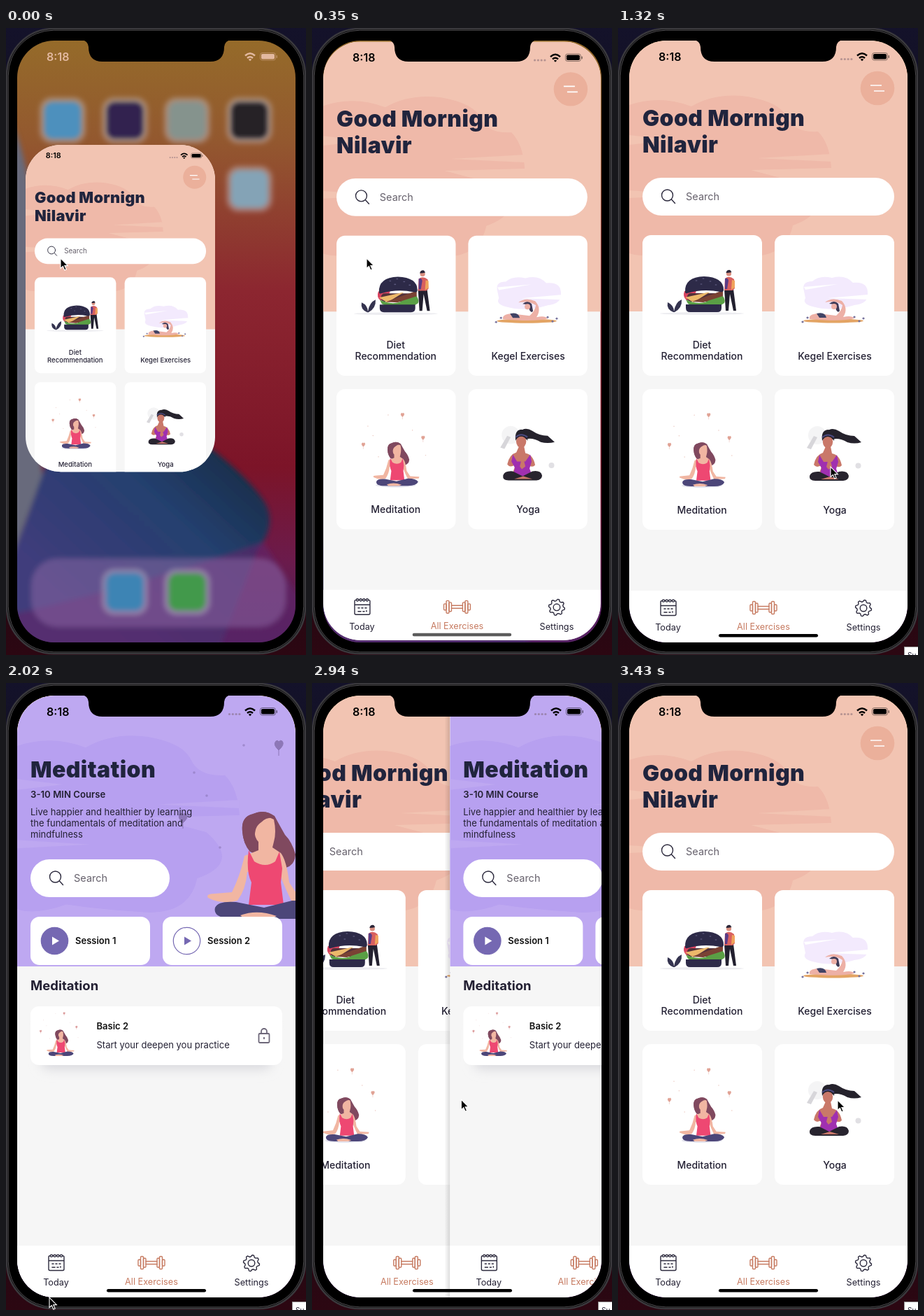
These frames come from a looping animation (429 px wide and 896 px high, 3.5 s). An HTML page:

```html
<!DOCTYPE html>
<html lang="en">
<head>
<meta charset="utf-8">
<title>Wellness app</title>
<style>
html, body { margin: 0; width: 100%; height: 100%; overflow: hidden; background: #0d0c18; }
svg { display: block; width: 100%; height: 100%; }
text { font-family: Inter, "Liberation Sans", sans-serif; fill: #232033; }
.h1 { font-size: 32px; font-weight: 900; letter-spacing: .4px; fill: #20243d; }
.h2 { font-size: 18.5px; font-weight: 700; }
.card { font-size: 14px; font-weight: 500; text-anchor: middle; }
.find { font-size: 14.5px; fill: #66616c; }
.body { font-size: 13px; }
.bold { font-size: 13px; font-weight: 600; fill: #111; }
.tab { font-size: 12.7px; text-anchor: middle; }
.time { font-size: 16px; font-weight: 600; text-anchor: middle; fill: currentColor; }
.line { fill: none; stroke: #2c2a3d; stroke-width: 1.4; stroke-linecap: round; stroke-linejoin: round; }
</style>
</head>
<body>
<svg id="stage" viewBox="0 0 429 896" preserveAspectRatio="none"></svg>
<script>
const SPAN = 3500, WIDTH = 398;

// ---- drawing helpers ----
const box = (x, y, w, h, r, fill, more = '') =>
  `<rect x="${x}" y="${y}" width="${w}" height="${h}" rx="${r}" fill="${fill}" ${more}/>`;
const path = (d, fill, more = '') => `<path d="${d}" fill="${fill}" ${more}/>`;
const line = (d, more = '') => `<path class="line" d="${d}" ${more}/>`;
const dot = (x, y, r, fill, more = '') => `<circle cx="${x}" cy="${y}" r="${r}" fill="${fill}" ${more}/>`;
const oval = (x, y, rx, ry, fill) => `<ellipse cx="${x}" cy="${y}" rx="${rx}" ry="${ry}" fill="${fill}"/>`;
const text = (cls, x, y, s, more = '') => `<text class="${cls}" x="${x}" y="${y}" ${more}>${s}</text>`;
const use = (id, move, color = '#000') => `<use href="#${id}" transform="${move}" color="${color}"/>`;
const group = (move, inner) => `<g transform="${move}">${inner}</g>`;

const gear = Array.from({ length: 32 }, (_, i) => {
  const a = (i - 1.5) * Math.PI / 16, r = i % 4 < 2 ? 9.2 : 11.6;
  return `${(351 + r * Math.cos(a)).toFixed(1)} ${(829 + r * Math.sin(a)).toFixed(1)}`;
}).join('L');

const search = (y, w) => box(35, y, w, 54, 27, '#fff') +
  `<circle class="line" cx="70.5" cy="${y + 25}" r="8"/>` + line(`M76.5 ${y + 31}l5 5.5`) +
  text('find', 97, y + 32, 'Search');

const calendar = line('M61 820.5q0-2 2-2h18q2 0 2 2v17q0 2-2 2h-18q-2 0-2-2zM61 825.5h22') +
  [65, 69.7, 74.3, 79].map(x => `<circle class="line" cx="${x}" cy="818.5" r="1.6" style="fill:#fff"/>`).join('') +
  line('M66 830h2m3 0h2m3 0h2M66 835h4m3 0h2m3-1v1', 'style="stroke-width:1.6"');

const dumbbell = `<g class="line" style="stroke:#c67a60">` +
  [[189, 824, 3.5, 9], [192.5, 819.5, 4, 18], [196.5, 822, 3.5, 13], [216, 822, 3.5, 13], [219.5, 819.5, 4, 18], [223.5, 824, 3.5, 9]]
    .map(b => box(...b, 1.2, 'none')).join('') + '<path d="M200 826.5h16m-16 4h16"/></g>';

const tabs = box(16, 804, 398, 76, 0, '#fff') + calendar + dumbbell +
  line(`M${gear}Z`) + '<circle class="line" cx="351" cy="829" r="4.8"/>' +
  text('tab', 71.5, 861, 'Today') + text('tab', 208, 860, 'All Exercises', 'style="fill:#c67a60"') +
  text('tab', 351, 861, 'Settings');

const wifi = `<g fill="none" stroke="currentColor" stroke-width="2.5">
  <path d="M342 39.5q7-6.5 14 0M345 43q4-3.6 8 0"/></g>` + path('M346.8 45q2.2-1.8 4.4 0L349 47.2z', 'currentColor');
const battery = box(363.5, 35.5, 22, 10.5, 3, 'none', 'stroke="currentColor" stroke-opacity=".45"') +
  box(365, 37, 19, 7.5, 1.8, 'currentColor') + box(386.6, 39, 1.4, 4, .7, 'currentColor', 'opacity=".5"');
const status = text('time', 74.3, 46.5, '8:18') + wifi + battery;

// ---- illustrations ----
const woman =
  path('M-31-113Q-33-134-17-137Q0-146 15-135Q22-122 30-108Q40-98 45-80Q44-62 26-60L-20-84Q-30-96-31-113z', '#80495f') +
  path('M-13-126Q0-138 14-130Q18-112 14-98L12-90L24-82Q32-72 36-40L48-22L80-20L78-14L40-12Q26-40 22-55L-24-55Q-26-30-38-14Q-60-8-80-18Q-84-24-70-24L-46-26Q-34-50-28-78L-8-86V-98Q-16-106-13-126z', '#f1b6a2') +
  path('M-22-86L-14-70Q2-60 16-70L22-84L26-60L24-40L28-8H-22L-18-40Q-26-56-22-86z', '#ee4872') +
  path('M-70-4Q-66-14-40-12L0-4L40-14Q70-14 76-2Q70 12 40 12H-40Q-74 12-70-4z', '#4c4679') +
  path('M-34 7Q-10-2 18 8L8 12H-28z', '#f1b6a2') +
  path('M-31-113Q-33-134-16-138Q4-146 16-132Q4-134-4-126Q-14-120-13-104Q-18-94-20-84Q-30-96-31-113z', '#80495f');

const hearts = [[21, -236], [-116, -132], [93, -156]].map(([x, y]) =>
  path(`M${x} ${y + 7}q-9-8-4-13q3-2 4 1q2-3 5-1q4 5-5 13v8`, 'currentColor', 'stroke="currentColor"')).join('') +
  [[-29, -236], [-82, -164], [-100, -197], [56, -183], [-63, -90], [102, -95]]
    .map(([x, y]) => dot(x, y, 1.8, 'currentColor', 'opacity=".6"')).join('');

const burger =
  oval(120, 408, 60, 1.8, '#ececf0') +
  path('M79 406Q69 402 71 392Q80 396 80 405Q82 392 91 388Q92 400 81 406z', '#34334f') +
  path('M95 376q-3 8 3 13h10l4-14z', '#d9435f') +
  box(99, 379, 51, 12, 5, '#53313a') +
  path('M97 388q16 8 30 3q8-8 23-8q4 6 2 10q-8 6-18 4q-20 4-34-3z', '#5a9f45') +
  path('M96 385L132 377L108 392z', '#ecb86a') + path('M106 391L150 375V383L122 392z', '#7a4234') +
  path('M97 395H148V400Q148 406 142 406H103Q97 406 97 400z', '#2d2a48') +
  path('M96 377Q95 356 123 355Q151 356 151 374Q151 378 146 377Q122 372 99 379Q96 380 96 377z', '#2d2a48') +
  [[112, 361], [122, 358], [132, 362], [119, 366], [140, 367]].map(([x, y]) => oval(x, y, 1.5, .8, '#5c587d')).join('') +
  path('M152 373H165L169 404H165L160 380L158 404H154z', '#22202f') +
  path('M153 358Q159 353 166 359L167 372L164 375H152z', '#d8605f') +
  path('M153 358q4-2 5 3l-2 12h-3z', '#5a3d87') + path('M163 360l4 1v10l-5 3z', '#f0a45c') +
  dot(158.5, 351, 3.6, '#d98f80') + path('M154.5 350q1-5 6-4l2 3q-4 1-8 1z', '#2b2638');

const stretch =
  path('M266 376Q262 362 278 362Q288 353 306 357Q325 352 336 364Q358 362 357 380Q358 394 338 396Q306 406 278 398Q263 394 268 386z', '#f3eafd') +
  path('M266 370L314 366L268 374zM357 381L300 386L357 388z', '#fff') +
  oval(308, 418.5, 43, 3, '#e3a464') +
  path('M274 416Q272 409 286 408L312 411Q320 404 321 396Q312 389 296 392Q306 384 320 390Q330 401 322 413Q334 410 338 415Q320 420 274 416z', '#edb0a6') +
  path('M284 408Q296 405 298 414H288z', '#414365') + path('M302 394q7-6 13 0l2 10q-2 4-5-1l-2-8z', '#3f3a55') +
  dot(309, 398, 4, '#edb0a6') +
  [[264, 420], [271, 414], [338, 413], [345, 419], [351, 415]].map(([x, y]) => path(`M${x} ${y - 1.7}l2 1.7l-2 1.7l-2-1.7z`, '#77729c')).join('');

const yoga =
  dot(285, 582, 13, '#f4f4f5') + dot(343.5, 625.5, 4, '#e1e0e4') +
  path('M280 583l5 2l-9 17l-6-2z', '#d7d6da') +
  path('M297 578Q305 569 316 576Q326 583 338 583L348 592Q338 595 328 592Q316 585 306 588z', '#25222c') +
  path('M293 607L297 598H304L306 608Q317 610 320 625Q316 630 308 624L316 642H286L292 624Q284 630 280 624Q283 610 293 607z', '#c97869') +
  path('M288 610l6 10h12l7-10l2 10l-3 10l5 14h-30l4-15l-5-9z', '#a030b0') +
  path('M298 627L302 611L306 627L301 631z', '#c97869') +
  path('M274 640Q276 633 288 634L302 641L316 634Q328 632 330 640Q330 646 322 647H282Q273 647 274 640z', '#28242f') +
  path('M290 645l13-4l13 4z', '#c97869') +
  oval(300, 591, 7.2, 9.5, '#c97869') +
  path('M292 590Q290 575 300 574Q311 575 309 590Q305 584 300 584Q295 584 292 590z', '#25222c') +
  path('M292 585Q300 578 309 585', 'none', 'stroke="#4b4a80" stroke-width="2"');

const cloud = (fill, gap) =>
  path('M16 110Q60 95 105 112Q140 92 185 98Q232 106 242 128Q252 150 286 148Q303 165 305 200L190 203L262 222Q308 262 250 282Q240 330 180 326Q120 322 80 316Q40 330 16 322z', fill) +
  path('M16 153L75 160L16 167zM16 232L110 238L16 243zM305 180L200 186L305 191z', gap);

// ---- screens ----
const cards = [[35, 296], [224, 296], [35, 516], [224, 516]].map(([x, y]) => box(x, y, 171, 201, 12, '#fff')).join('');
const home = box(16, 18, 398, 862, 0, '#f6f6f6') + box(16, 18, 398, 387, 0, '#f2c4b2') + cloud('#efb9a9', '#f2c4b2') +
  dot(371, 86, 24.3, '#ebb09b') + path('M361 82h16M366 90h15', 'none', 'stroke="#fff" stroke-width="1.7"') +
  text('h1', 35, 140, 'Good Mornign') + text('h1', 35, 178, 'Nilavir') + search(214, 360) + cards +
  burger + stretch + yoga + use('hearts', 'translate(121 650) scale(.41)', '#e0a294') +
  oval(120, 654, 29, 3, '#e4e4ee') + use('woman', 'translate(121 650) scale(.41)') +
  text('card', 120, 458, 'Diet') + text('card', 120, 474, 'Recommendation') + text('card', 310, 474, 'Kegel Exercises') +
  text('card', 120, 694, 'Meditation') + text('card', 310, 694, 'Yoga') + use('tabs', '');

const session = (x, n, done) => box(x, 334, 171, 69, 13, '#fff', `id="session${n}"`) +
  dot(x + 34.5, 368.5, 19.2, done ? '#7568b2' : '#fff', 'stroke="#7568b2" stroke-width="1.2"') +
  path(`M${x + 31} 362.5l10 6l-10 6z`, done ? '#fff' : '#7568b2') + text('bold', x + 64, 373, 'Session ' + n);

const detail = box(8, 18, 8, 862, 0, 'url(#edge)') + box(16, 18, 398, 862, 0, '#f6f6f6') +
  `<g clip-path="url(#head)">` + box(16, 18, 398, 387, 0, '#bea8f1') +
  group('translate(-1.6 -31) scale(1.1)', cloud('#b7a0f0', '#bea8f1')) +
  use('hearts', 'translate(369 325)', '#8d77b7') + use('woman', 'translate(369 325)') + '</g>' +
  text('h1', 35, 135, 'Meditation') + text('bold', 35, 164, '3-10 MIN Course', 'style="font-size:13.2px;fill:#232033"') +
  ['Live happier and healthier by learning', 'the fundamentals of meditation and', 'mindfulness']
    .map((s, i) => text('body', 35, 189.3 + 15.7 * i, s)).join('') +
  search(252, 199) + session(35, 1, true) + session(224, 2, false) + text('h2', 35, 439, 'Meditation') +
  box(50, 486, 330, 66, 12, '#d9d9de', 'filter="url(#soft)"') + box(35, 462, 360, 84, 12, '#fff') +
  use('hearts', 'translate(78 530) scale(.245)', '#dc9c9c') + use('woman', 'translate(78 530) scale(.245)') +
  text('bold', 129.5, 495, 'Basic 2') + text('body', 129.5, 521.5, 'Start your deepen you practice') +
  `<g fill="none" stroke="#6d6779" stroke-width="1.8">` + box(361.5, 501, 15, 13, 1.5, 'none') +
  '<path d="M365 501v-3a4 4 0 0 1 8 0v3M369 506v3"/></g>' + use('tabs', '');

const icon = (x, y, fill) => box(x - 33, y - 33, 66, 66, 18, '#c9c3d0', 'opacity=".4"') + box(x - 27, y - 27, 54, 54, 13, fill);
const wallpaper = box(0, 0, 429, 896, 0, 'url(#sky)') + `<g filter="url(#blur)">` +
  path('M0 120Q26 160 38 260L52 640L0 780z', '#686a7c') +
  path('M62 610L30 700L0 780V900H300L360 745Q388 710 370 678Q345 640 285 595z', 'url(#sea)') +
  path('M0 840Q180 800 368 735L430 830V900H0z', '#60266a', 'opacity=".65"') +
  box(36, 758, 364, 98, 38, '#8d6ba5', 'opacity=".5"') +
  icon(81, 132, '#4d90bd') + icon(170, 132, '#30234f') + icon(259, 132, '#85938d') + icon(348, 132, '#262126') +
  icon(348, 230, '#84a3b6') + icon(170, 806, '#3c84b4') + icon(259, 806, '#43994c') +
  '</g>' + `<g color="#e3b9a0">${status}</g>`;

const stops = list => list.map(([o, c, a = 1]) => `<stop offset="${o}" stop-color="${c}" stop-opacity="${a}"/>`).join('');
const shade = (id, list, to = 'x2="0" y2="1"') => `<linearGradient id="${id}" ${to}>${stops(list)}</linearGradient>`;

stage.innerHTML = `<defs>
  ${shade('desk', [[0, '#14122a'], [.5, '#0c0a14'], [1, '#2c0712']])}
  ${shade('sky', [[0, '#956d29'], [.18, '#93582f'], [.42, '#8c2630'], [.7, '#7c1428'], [.85, '#6b1b4c'], [1, '#43205c']])}
  ${shade('sea', [[0, '#12273b'], [.45, '#243f6e'], [1, '#403c7c']], 'x1="1" x2=".2" y2=".7"')}
  ${shade('edge', [[0, '#000', 0], [1, '#000', .14]], '')}
  <filter id="blur"><feGaussianBlur stdDeviation="3.5"/></filter>
  <filter id="soft" x="-10%" y="-40%" width="120%" height="190%"><feGaussianBlur stdDeviation="8"/></filter>
  <clipPath id="screen">${box(16, 18, 398, 860, 53, '#000')}</clipPath>
  <clipPath id="head">${box(16, 18, 398, 387, 0, '#000')}</clipPath>
  <clipPath id="frame"><rect id="pane" x="16" y="18" width="398" height="860"/></clipPath>
  <g id="woman">${woman}</g><g id="hearts">${hearts}</g><g id="tabs">${tabs}</g>
</defs>
${box(0, 0, 429, 896, 0, 'url(#desk)')}
${box(1, 1, 427, 893, 67, '#000', 'stroke="#3a393d" stroke-width="2.5"')}
${box(3.2, 3.2, 422.6, 888.6, 65, '#000', 'stroke="#666468" stroke-width=".8"')}
<g clip-path="url(#screen)">
  ${wallpaper}
  <g id="app"><g clip-path="url(#frame)">
    <g id="home">${home}</g><g id="detail">${detail}</g>
    <g color="#000">${status}</g>
    ${[319.5, 324.3, 329.1, 333.9].map(x => dot(x, 44.5, 1.6, '#7a6270', 'opacity=".5"')).join('')}
    ${box(144, 866, 142, 4.6, 2.3, '#000', 'id="bar"')}
  </g></g>
</g>
${path('M108 17Q117 18 118 27Q118 48 138 48H292Q312 48 312 27Q313 18 322 17z', '#000')}
<g id="tip">${box(409.5, 884.5, 30, 20, 0, '#fff', 'stroke="#999"')}${text('', 414, 900, 'Su', 'font-size="10"')}</g>
<g id="cursor">${path('M0 0V14.5L3.4 11.4L5.8 17L8.2 16L5.8 10.6H10.4z', '#000', 'stroke="#fff" stroke-width="1.1"')}</g>`;

// ---- motion ----
const $ = id => document.getElementById(id);
const parts = {};
for (const id of ['app', 'pane', 'home', 'detail', 'bar', 'tip', 'cursor', 'session2']) parts[id] = $(id);
const mix = (a, b, u) => a + (b - a) * u;
const part = (t, a, b) => Math.min(1, Math.max(0, (t - a) / (b - a)));
const smooth = u => u * u * (3 - 2 * u);
const out = u => 1 - (1 - u) ** 3;
const move = (el, x, y = 0) => el.setAttribute('transform', `translate(${x} ${y})`);

// the back swipe: pointer x and time where it grabs and lets go
const GRAB = { t: 2765, x: 32 }, DROP = { t: 3060, x: 314 };

// time, x, y of the pointer
const trail = [[0, 78, 329], [700, 78, 329], [1250, 304, 627], [1320, 304, 627], [1500, 125, 612], [1580, 125, 612],
  [2020, 62, 878], [2470, 295, 377], [2620, 295, 377], [GRAB.t, GRAB.x, 594], [DROP.t, DROP.x, 596], [SPAN, DROP.x, 596]];

function pointer(t) {
  const i = trail.findIndex(p => p[0] > t), a = trail[i - 1], b = trail[i];
  const u = smooth(part(t, a[0], b[0]));
  return [mix(a[1], b[1], u), mix(a[2], b[2], u)];
}

// left shift of the detail page: pushed in, dragged, released
function shift(t, x) {
  if (t < GRAB.t) return WIDTH * (1 - out(part(t, 1540, 1980)));
  if (t < DROP.t) return x - GRAB.x;
  return mix(DROP.x - GRAB.x, WIDTH, out(part(t, DROP.t, 3330)));
}

function draw(now) {
  const t = now % SPAN, [x, y] = pointer(t);
  const open = 1 - Math.exp(-Math.max(0, t - 12) / 75), s = mix(.681, 1, open);
  parts.app.setAttribute('transform', `translate(${mix(28, 16, open)} ${mix(167, 18, open)}) scale(${s}) translate(-16 -18)`);
  parts.pane.setAttribute('height', mix(686, 860, open));
  parts.pane.setAttribute('rx', mix(74, 53, open));
  parts.bar.setAttribute('opacity', part(t, 210, 430));

  const off = shift(t, x);
  move(parts.home, (off - WIDTH) / 3);
  move(parts.detail, off);
  parts.detail.style.display = off < WIDTH ? '' : 'none';
  parts.session2.setAttribute('fill', t >= 2500 && t < 2660 ? '#f4f3f5' : '#fff');
  parts.tip.style.display = t >= 1180 ? '' : 'none';
  move(parts.cursor, x, y);
}

const start = performance.now();
function tick() {
  draw(performance.now() - start);
  requestAnimationFrame(tick);
}
tick();
</script>
</body>
</html>
```
